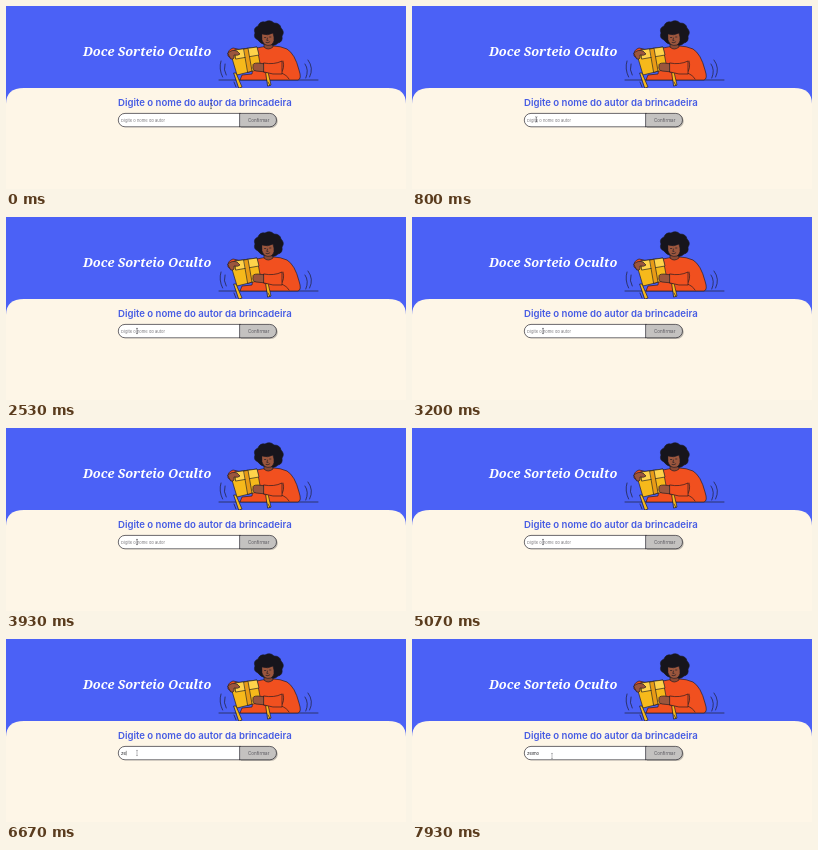
These frames come from a looping animation (400x183 px, 8000 ms). An HTML page:

```html
<!DOCTYPE html>
<html lang="pt">
<head>
<meta charset="utf-8">
<title>Sorteio</title>
<style>
html, body { margin: 0; width: 100%; height: 100%; overflow: hidden; background: #fef6e7; }
svg { display: block; width: 100%; height: 100%; }
text { font-family: Inter, "Open Sans", sans-serif; white-space: pre; }
.title { font: italic 700 12.8px "Noto Serif", serif; fill: #fff; }
.heading { font-size: 9.6px; font-weight: 600; fill: #465be3; }
.small { font-size: 4.1px; }
.ink { stroke: #1b1a22; stroke-width: .65; stroke-linejoin: round; stroke-linecap: round; }
.line { fill: none; }
</style>
</head>
<body>
<svg viewBox="0 0 400 183" preserveAspectRatio="none">
  <rect width="400" height="183" fill="#4b61f6"/>
  <text class="title" x="77" y="49.5">Doce Sorteio Oculto</text>

  <g class="ink">
    <path class="line" d="M213 74H312"/>
    <path class="line" d="M215 55q-2.4 8 1.6 16M219 58q-1.8 6 1.2 11M299 58q4.2 6 .8 14M302 54q6 8 1.6 17"/>
    <!-- sweater -->
    <path fill="#f1501f" d="M256 41Q248 42 241 45L227 42Q221 44 222 50L229 55L248 53L246 68L236 69L234 74H292Q296 73 293 64Q289 48 281 43Q274 40 268 40Z"/>
    <path class="line" d="M277 55Q279 62 275 67L258 66M275 67Q281 69 283 73"/>
    <!-- neck, face and hair -->
    <path fill="#8b4a35" d="M258 35V41Q262 45 267 41V34Z"/>
    <path fill="#17151c" d="M252 34Q247 32 249 27Q247 22 252 20Q254 15 259 16Q264 13 268 17Q274 17 275 22Q279 26 276 30Q277 36 272 37Q268 41 264 38Q256 40 252 34Z"/>
    <path fill="#9b563d" d="M256 28Q262 30 267 27Q270 36 265 39Q258 41 256 34Z"/>
    <path class="line" d="M258.5 31.5h1.3M263.6 31h1.3M261.5 32l-.7 2.4h1.2M260 36.5q2 .9 3.8-.6"/>
    <!-- gift -->
    <path fill="#f6b91b" d="M229 44L251 41L255 63L231 69L226 52Z"/>
    <path fill="#ffd34b" d="M229 44L251 41L253 49L230 53Z"/>
    <path fill="#e99b16" d="M238 43L242 42.3L246 65L242 66.3Z"/>
    <path fill="#f6b91b" d="M228 67L230 67L236 81L233 82ZM260 67L262 66L265 79L262 80Z"/>
    <!-- hands -->
    <path fill="#9b563d" d="M222 47Q226 43 231 45L234 48Q232 50 228 49Q229 54 225 53Z"/>
    <path fill="#9b563d" d="M260 58L252 57Q246 57 247 60Q246 64 250 65L260 66Z"/>
    <path fill="#f1501f" d="M258 57Q268 59 276 55L276 68Q267 69 258 66Z"/>
  </g>

  <path d="M0 183V98Q0 82 18 82H382Q400 82 400 98V183Z" fill="#fef6e7"/>
  <path class="ink" d="M228 76L230 81M262 76L264 79.5" stroke-width="1"/>
  <text class="heading" x="112" y="99.7">Digite o nome do autor da brincadeira</text>

  <path d="M235 108.3H265a6.8 6.8 0 0 1 0 13.6H235Z" fill="#8d8983" opacity=".55"/>
  <path class="ink" d="M234 107.4H119a6.7 6.7 0 0 0 0 13.4H234Z" fill="#fff"/>
  <path class="ink" d="M234 107.4H263.8a6.7 6.7 0 0 1 0 13.4H234Z" fill="#c4c2c0"/>
  <text x="242" y="115.7" font-size="4.5" fill="#55545a">Confirmar</text>
  <text id="field" class="small" x="115" y="115.5"></text>
  <path id="caret" d="M0 111.8V116.4" stroke="#222" stroke-width=".45"/>
  <path id="pointer" d="M-1-2.7Q0-2.7 0-2Q0-2.7 1-2.7M0-2V2M-1 2.7Q0 2.7 0 2Q0 2.7 1 2.7" fill="none" stroke="#34343b" stroke-width=".55"/>
</svg>
<script>
const LOOP = 8000;
const PLACEHOLDER = "Digite o nome do autor";
const NAME = "Zelmo";
const keyTimes = [5950, 6400, 7050, 7300, 7600];
const stops = [
  [0, 205, 100], [70, 205, 100], [830, 124, 113.5], [1800, 124, 113.5],
  [2400, 131, 114], [7800, 131, 114], [7930, 140, 117], [LOOP, 140, 117]
];
const field = document.getElementById("field");
const caret = document.getElementById("caret");
const pointer = document.getElementById("pointer");

const ease = p => p * p * (3 - 2 * p);
const mix = (a, b, p) => a + (b - a) * p;

function pointerAt(t) {
  const i = stops.findIndex((s, n) => n > 0 && t <= s[0]);
  const [t0, x0, y0] = stops[i - 1], [t1, x1, y1] = stops[i];
  const p = ease((t - t0) / (t1 - t0));
  return [mix(x0, x1, p), mix(y0, y1, p)];
}

function setField(value) {
  const shown = value || PLACEHOLDER;
  if (field.textContent !== shown) field.textContent = shown;
  field.setAttribute("fill", value ? "#17171b" : "#77757a");
}

function draw(t) {
  const typed = NAME.slice(0, keyTimes.filter(k => t >= k).length);
  setField(typed);
  const x = 115 + (typed ? field.getComputedTextLength() + .3 : 0);
  caret.setAttribute("transform", `translate(${x} 0)`);
  caret.setAttribute("visibility", typed && t < 7850 ? "visible" : "hidden");
  pointer.setAttribute("transform", `translate(${pointerAt(t)})`);
  pointer.setAttribute("opacity", typed ? .6 : 1);
}

const start = performance.now();
function tick() {
  draw((performance.now() - start) % LOOP);
  requestAnimationFrame(tick);
}
tick();
</script>
</body>
</html>
```
